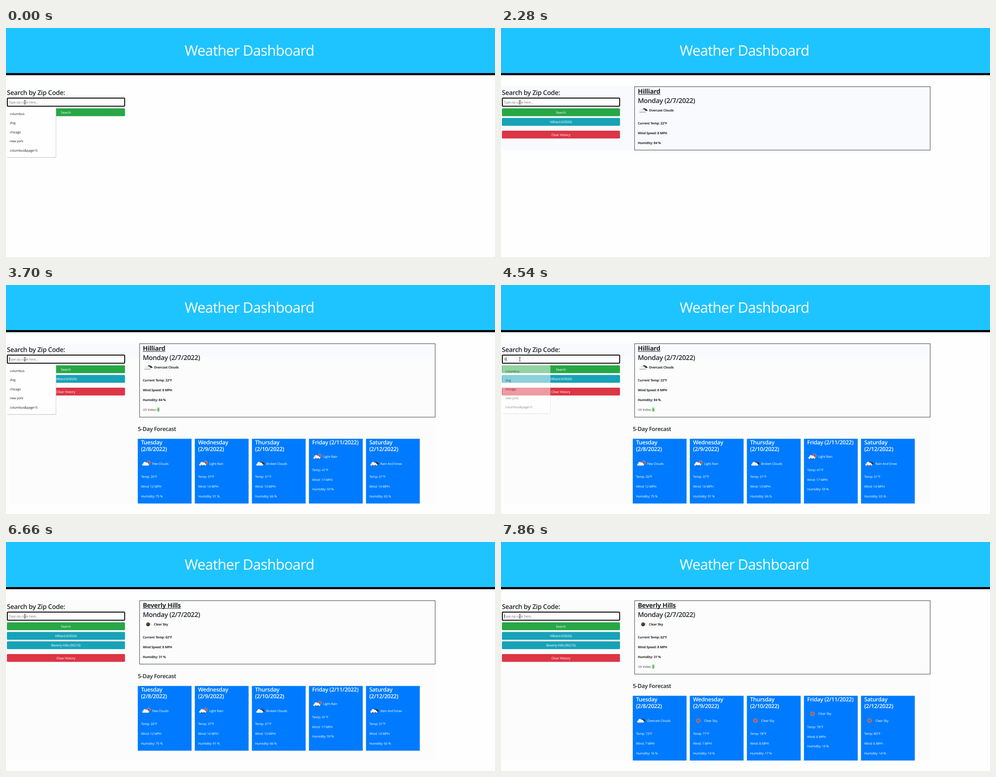
Recreate the animation shown at these times as an HTML page. Size 1091 by 513 pixels, loop 8000 ms.

```html
<!DOCTYPE html>
<html lang="en">
<head>
<meta charset="utf-8">
<title>Weather Dashboard</title>
<style>
  html, body { margin: 0; height: 100%; overflow: hidden; background: #fefefe; }
  svg { display: block; width: 100vw; height: 100vh; }
  text {
    font-family: "Open Sans", "Noto Sans", sans-serif;
    letter-spacing: -.025em;
    text-rendering: geometricPrecision;
  }
</style>
</head>
<body>
<svg id="stage" viewBox="0 0 1091 513"></svg>
<script>
const LOOP = 8000;
const INK = '#212529';
const stage = document.getElementById('stage');

// Step lists: [start time, value]
const TYPED = [[0, ''], [120, '4'], [480, '43'], [980, '430'], [1350, '4302'], [1600, '43026'],
  [2280, ''], [4540, '9'], [4860, '90'], [5170, '902'], [5450, '9021'], [5730, '90210'], [6660, '']];
const CARET = [[0, 0], [120, 1], [2130, 0], [2680, 1], [3140, 0], [3700, 1], [4260, 0],
  [4540, 1], [6350, 0], [6780, 1], [7270, 0], [7860, 1]];
const MENU = [[0, 1], [120, .5], [240, .2], [360, 0], [3700, 1], [4540, .5], [4690, 0]];
const SUGGESTIONS = ['columbus', 'dog', 'chicago', 'new york', 'columbus&amp;page=5'];

const DAYS = ['Tuesday', 'Wednesday', 'Thursday', 'Friday', 'Saturday'];
// icon, label, temperature, wind, humidity
const HILLIARD = [
  ['few', 'Few Clouds', 26, 12, 75],
  ['rain', 'Light Rain', 37, 14, 91],
  ['broken', 'Broken Clouds', 31, 13, 66],
  ['rain', 'Light Rain', 41, 17, 59],
  ['snow', 'Rain And Snow', 31, 14, 65]];
const BEVERLY = [
  ['broken', 'Overcast Clouds', 73, 7, 16],
  ['sun', 'Clear Sky', 77, 7, 14],
  ['sun', 'Clear Sky', 78, 8, 17],
  ['sun', 'Clear Sky', 78, 6, 14],
  ['sun', 'Clear Sky', 80, 6, 14]];

const at = (steps, t) => steps.filter(s => s[0] <= t).pop()[1];

const text = (x, y, str, size = 7.3, fill = INK, weight = 400, extra = '') =>
  `<text x="${x}" y="${y}" font-size="${size}" fill="${fill}" font-weight="${weight}" ${extra}>${str}</text>`;

const rect = (x, y, x2, y2, fill, extra = '') =>
  `<rect x="${x}" y="${y}" width="${x2 - x}" height="${y2 - y}" fill="${fill}" ${extra}/>`;

const button = (y, label, fill) => rect(2, y, 265.5, y + 17.5, fill, 'rx="2"') +
  text(133.6, y + 11.6, label, 7.4, '#fff', 400, 'text-anchor="middle"');

const cloud = (fill, move = '') => `<path transform="${move}" fill="${fill}"
  d="M-7 4.5C-10 4.5-10 .5-7 .2C-7-4-1.5-5-.3-1.8C2.5-3 4.5-1 4 .6C7 .8 7 4.5 4 4.5Z"/>`;

const sun = (x, y, r) => `<circle cx="${x}" cy="${y}" r="${r + 1}" fill="none" stroke="#ffa640"
  stroke-width="2" stroke-dasharray="1.2 1.5"/><circle cx="${x}" cy="${y}" r="${r}" fill="#e8432a"/>`;

const drops = colors => colors.map((c, i) =>
  `<ellipse cx="${-4 + i * 3}" cy="${4.2 + i % 2}" rx="1" ry="1.4" fill="${c}"/>`).join('');

const darkCloud = cloud('#333', 'translate(5 -1.5) scale(.72)');
const ICONS = {
  few: sun(5, -2.5, 2.6) + cloud('#f4f4f4'),
  rain: sun(5, -2.5, 2.6) + cloud('#f4f4f4') + drops(['#123c8c', '#123c8c', '#123c8c']),
  broken: darkCloud + cloud('#f4f4f4'),
  snow: darkCloud + cloud('#f4f4f4') + drops(['#123c8c', '#d9432f', '#123c8c']),
  sun: sun(0, 0, 3),
  overcast: cloud('#444', 'translate(4 -2) scale(.8)') + cloud('#eee', 'translate(-1 0)') +
    '<path d="M-9 4.4H5" stroke="#888" stroke-width="1"/>',
  night: '<circle cx="-1" r="4.3" fill="#4a2b1d"/><circle cx="-2" cy="-1" r="2" fill="#7a5140"/>' +
    '<path d="M4.6-2.5v1.2M5.4.5v1.2" stroke="#755" stroke-width="1"/>'
};
const icon = (kind, x, y) => `<g transform="translate(${x} ${y})">${ICONS[kind]}</g>`;

function card(data, i, top) {
  const [kind, label, temp, wind, humidity] = data;
  const x = 294 + i * 127.3, tx = x + 7.2;
  const date = `(2/${8 + i}/2022)`;
  const oneLine = DAYS[i] === 'Friday';
  const y = top - (oneLine ? 15.3 : 0);
  const title = (str, dy) => text(tx, top + dy, str, 12.6, '#fff', 600);
  const line = (dx, dy, str) => text(tx + dx, y + dy, str, 7.25, '#fff');
  return rect(x, top, x + 120, top + 145, '#007bff') +
    (oneLine ? title(`${DAYS[i]} ${date}`, 12.4) : title(DAYS[i], 12.4) + title(date, 27.7)) +
    icon(kind, x + 19, y + 55.5) + line(24.8, 58, label) +
    line(0, 87.4, `Temp: ${temp}°F`) +
    line(0, 109.3, `Wind: ${wind} MPH`) +
    line(0, 131.2, `Humidity: ${humidity} %`);
}

function backdrop(t) {
  if (t < 2280) return '';
  if (t < 2680) return rect(2, 131, 958, 274, '#f9fafd');
  const plain = rect(2, 131, 958, 490, '#fcfcfc');
  if (t >= 6660) return plain;
  return rect(2, 131, 958, 274, '#f9fafd') + rect(7, 160, 958, 490, '#fcfcfc') +
    (t >= 3700 ? rect(0, 177, 113, 291, '#fefefe') : '');
}

function weather(t) {
  const second = t >= 6660;
  const hasUv = t >= 2680 && !second || t >= 7150;
  const bottom = hasUv ? 296 : 273.5;
  const [city, kind, sky, temp, humidity] = second
    ? ['Beverly Hills', 'night', 'Clear Sky', 62, 31]
    : ['Hilliard', 'overcast', 'Overcast Clouds', 22, 84];
  const bold = (x, y, str) => text(x, y, str, 7.2, INK, 700);
  let out = rect(298, 131.5, 957.5, bottom, 'none', 'stroke="#343a40"') +
    text(305.2, 147, city, 14.5, INK, 700) +
    rect(305.2, 148.3, second ? 390.5 : 355.5, 149.4, INK) +
    text(305.2, 168, 'Monday (2/7/2022)', 14.9, INK, 600) +
    icon(kind, 318, 184.5) + bold(330, 187.3, sky) +
    bold(305.2, 216.3, `Current Temp: ${temp}°F`) +
    bold(305.2, 238.3, 'Wind Speed: 8 MPH') +
    bold(305.2, 260.3, `Humidity: ${humidity} %`);
  if (hasUv) out += rect(337.3, 274, 342.3, 284, '#90ee90') +
    text(305.2, 282, 'UV Index:', 7.3, '#444') + text(337.8, 282, '0');
  if (t >= 2680) {
    const top = hasUv ? 344.5 : 322.5;
    const days = t < 7150 ? HILLIARD : BEVERLY;
    out += text(294, top - 17.5, '5-Day Forecast', 12.7, INK, 600) +
      days.map((d, i) => card(d, i, top)).join('');
  }
  return out;
}

function menu(alpha) {
  if (!alpha) return '';
  const scale = alpha < 1 ? .975 : 1;
  return `<g opacity="${alpha}" transform="translate(56.5 233) scale(${scale}) translate(-56.5 -233)">` +
    rect(2, 181, 112, 290.5, '#bbb', 'rx="2"') + rect(1.5, 177.5, 111.3, 289.5, '#fefefe', 'rx="2"') +
    SUGGESTIONS.map((s, i) => text(8.6, 194.6 + i * 20.55, s, 7.4, INK, 500)).join('') + '</g>';
}

function field(t) {
  const typed = at(TYPED, t);
  const caretX = 7.3 + typed.length * 4;
  return rect(3, 157, 264.7, 175.2, '#fefefe', 'rx="1.5" stroke="#000" stroke-width="2"') +
    (typed ? text(6.8, 169, typed, 7.3, '#333') : text(6.3, 169, 'Type zip code here...', 7.25, '#757575')) +
    (at(CARET, t) ? rect(caretX, 161.5, caretX + .8, 171, '#000') : '');
}

function scene(t) {
  let out = rect(0, 0, 1091, 513, '#fefefe') + rect(0, 0, 1091, 101, '#1ec4ff') +
    rect(0, 101, 1091, 105.7, '#000') +
    text(543, 62, 'Weather Dashboard', 32.3, '#fff', 400, 'text-anchor="middle"') +
    backdrop(t) + text(2, 150, 'Search by Zip Code:', 14.6, INK, 600) +
    field(t) + button(180, 'Search', '#28a745');
  if (t >= 2280) {
    const second = t >= 6660;
    out += button(201.5, 'Hilliard (43026)', '#17a2b8') +
      (second ? button(222.5, 'Beverly Hills (90210)', '#17a2b8') : '') +
      button(second ? 251 : 230, 'Clear History', '#dc3545') + weather(t);
  }
  return out + menu(at(MENU, t)) +
    '<path d="M40 162.2h1.5l.5.6.5-.6H44M42 162.8v7.4M40 170.8h1.5l.5-.6.5.6H44" fill="none" stroke="#222" stroke-width=".9"/>';
}

let shown = '';
const start = performance.now();
function frame() {
  const next = scene((performance.now() - start) % LOOP);
  if (next !== shown) stage.innerHTML = shown = next;
  requestAnimationFrame(frame);
}
frame();
</script>
</body>
</html>
```
